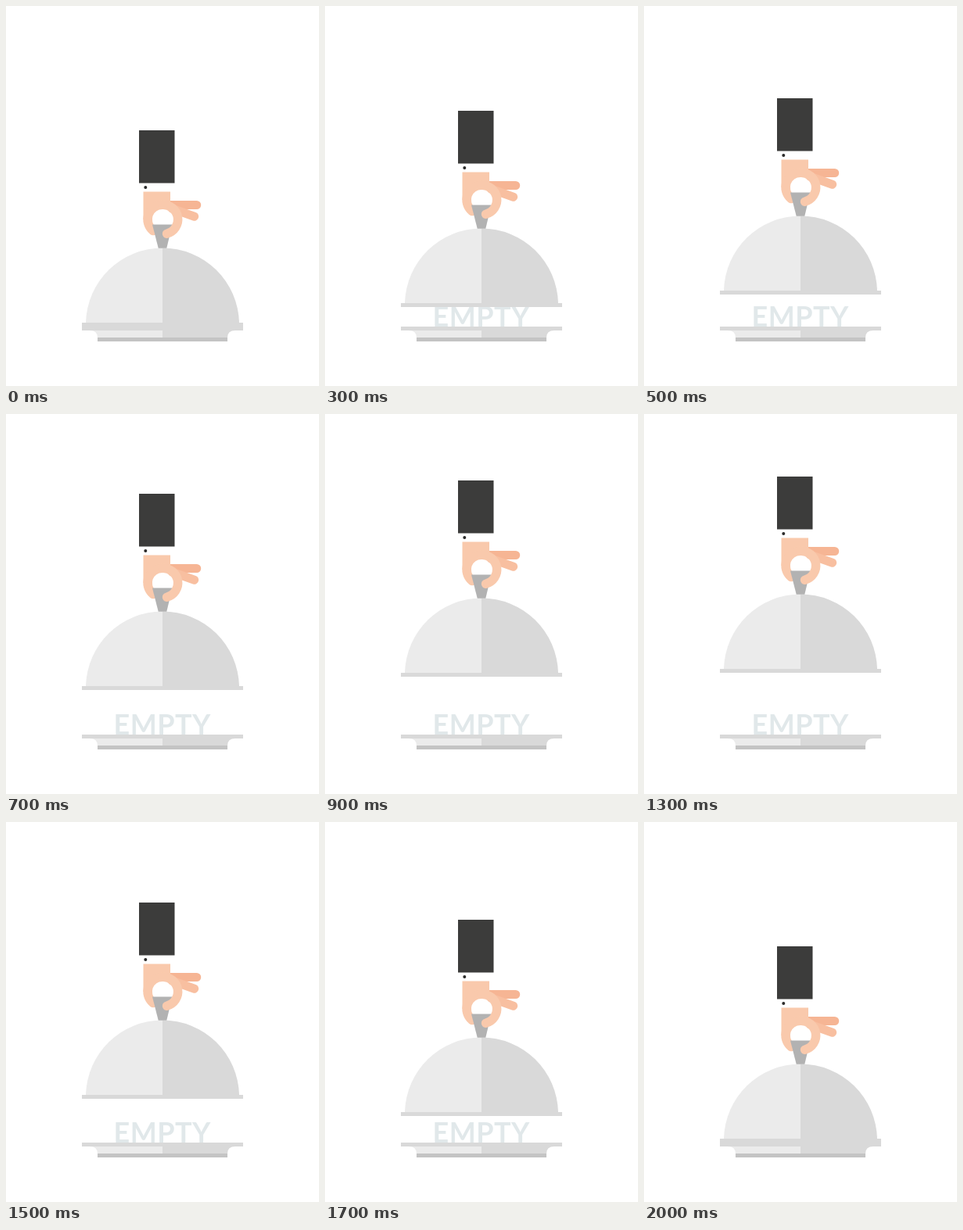
Recreate the animation shown at these times as an HTML page. Size 400x486 px, loop 3000 ms.

```html
<!DOCTYPE html>
<html lang="en">
<head>
<meta charset="utf-8">
<title>Empty cloche</title>
<style>
  html, body { margin: 0; width: 100%; height: 100%; overflow: hidden; background: #fff; }
  svg { position: absolute; left: 0; top: 0; width: 400px; height: 486px; }
  .label { font: bold 36px Lato, sans-serif; letter-spacing: .5px; fill: #e1e8ea; }
  .light { fill: #ebebeb; }
  .shade { fill: #d9d9d9; }
  .skin { fill: #f9c9ac; }
  .finger { fill: none; stroke: #f9c9ac; stroke-width: 11.5; stroke-linecap: round; }
  .middle { stroke: #f8bfa0; stroke-width: 11; }
  .rear { stroke: #f6b594; stroke-width: 11; }

  /* Animating top keeps the lid on whole pixels. */
  .lid { animation: lift 3s infinite; }
  @keyframes lift {
    0% { top: 0; animation-timing-function: steps(11, end); }
    36.6666% { top: -90px; animation-timing-function: step-end; }
    40% { top: -90px; animation-timing-function: steps(8, end); }
    66.6666%, 100% { top: 0; }
  }
</style>
</head>
<body>
<svg class="plate" viewBox="0 0 400 486">
  <text class="label" x="137.5" y="410">EMPTY</text>
  <rect class="shade" x="97" y="410" width="206" height="5"/>
  <path class="light" d="M107 415Q117 415 117 424H200V415Z"/>
  <path class="shade" d="M293 415Q283 415 283 424H200V415Z"/>
  <rect x="117" y="424" width="166" height="5" fill="#c4c4c4"/>
</svg>

<svg class="lid" viewBox="0 0 400 486">
  <path class="light" d="M102 405A98 98 0 0 1 200 309.5V405Z"/>
  <path class="shade" d="M298 405A98 98 0 0 0 200 309.5V405Z"/>
  <rect class="shade" x="97" y="405" width="206" height="5"/>

  <rect x="170" y="159" width="45.5" height="67.5" fill="#3c3c3b"/>
  <circle cx="178.3" cy="232" r="2" fill="#2b2b2a"/>

  <path class="finger rear" d="M210 254.5H243.7"/>
  <path class="finger middle" d="M212 259L240.7 269.2"/>
  <path class="skin" d="M175.5 237.5H210V260H187V273H175.5Z"/>
  <path class="finger" d="M188 287.6A18.8 18.8 0 0 1 200 254.2"/>
  <path d="M187 279.5H212.5L205.3 309.7H194.7Z" fill="#b2b2b2"/>
  <path class="finger" d="M200 254.2A18.8 18.8 0 0 1 205.5 291.2"/>
</svg>
</body>
</html>
```
